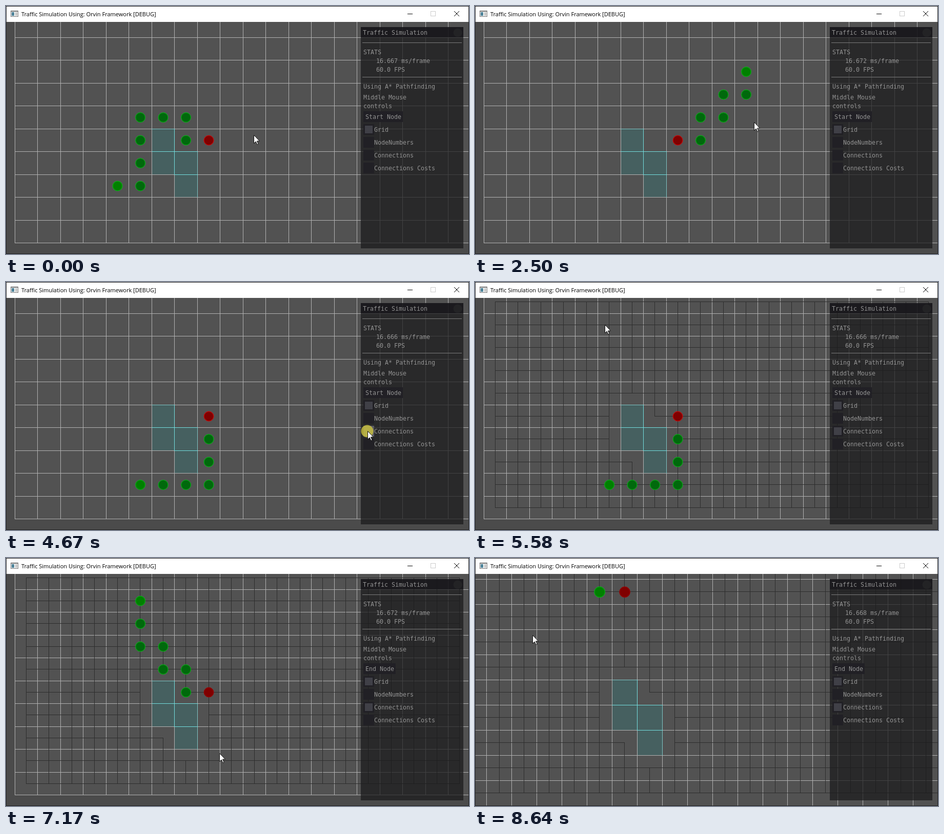
Write an HTML page with a canvas that moves like this. It is 903 px wide and 483 px high and loops after 8.71 s.

```html
<!DOCTYPE html>
<html lang="en">
<head>
<meta charset="utf-8">
<title>Traffic Simulation</title>
<style>
html, body { margin: 0; width: 100%; height: 100%; overflow: hidden; background: #4b4b4b; }
canvas { display: block; }
</style>
</head>
<body>
<canvas id="stage" width="903" height="483"></canvas>
<script>
const ctx = document.getElementById("stage").getContext("2d");
const LOOP = 8710, REST = 100, PRESS = 70;
const COLS = 20, ROWS = 10, PITCH = 44.5, LEFT = 17, TOP = 16.5;
const CONNECT_AT = 4740, MODE_AT = 6770, ZOOM_AT = 8420;
const MONO = '11.63px "DejaVu Sans Mono", monospace';
const isWall = (i, j) => i === 6 && (j === 5 || j === 6) || i === 7 && (j === 6 || j === 7);

// Cells visited from a start, one letter per step
function trace(i, j, path) {
  const cells = [[i, j]];
  for (const step of path) {
    i += (step === "R") - (step === "L");
    j += (step === "D") - (step === "U");
    cells.push([i, j]);
  }
  return cells;
}

// Stops of the cursor: plain points, pressed buttons and picked nodes
const point = (at, x, y) => ({ at, x, y });
const press = (at, x, y) => ({ at, x, y, press: true });
const pick = (at, [i, j], route) =>
  ({ at, x: LEFT + (i + .5) * PITCH - 9, y: TOP + (j + .5) * PITCH, route });
const pickStart = (at, i, j, path) => pick(at, [i, j], trace(i, j, path));
const pickEnd = (at, path) => {
  const route = trace(5, 1, path);
  return pick(at, route.at(-1), route);
};
const stops = [
  { ...point(0, 483, 251), route: trace(4, 7, "RUUURRDR") },
  pickStart(1500, 11, 2, "DLDLDL"),
  pickStart(3390, 12, 6, "LLLLU"),
  pickStart(3935, 5, 8, "RRRUUU"),
  press(4670, 705, 290),
  pickStart(5650, 5, 1, "DDRDRDR"),
  press(6700, 752, 220),
  pickEnd(7350, "DDDDDDRDRR"),
  point(7815, 540, 224),
  pickEnd(8210, "R"),
  point(8655, 112, 150)
];

function cursorAt(t) {
  const n = stops.findLastIndex(s => s.at <= t);
  const a = stops[n], b = stops[n + 1] || a;
  const span = b.at - a.at - 2 * REST;
  const u = span > 0 ? Math.min(1, Math.max(0, (t - a.at - REST) / span)) : 0;
  const eased = u * u * (3 - 2 * u);
  return {
    x: Math.round(a.x + (b.x - a.x) * eased),
    y: Math.round(a.y + (b.y - a.y) * eased),
    pressed: stops.some(s => s.press && Math.abs(t - s.at) <= PRESS)
  };
}

// Milliseconds per frame: a slow swell and one late spike
function frameTime(t) {
  const bump = (height, center, width) => height * Math.exp(-(((t - center) / width) ** 2));
  return 16.66635 + bump(.0069, 2000, 1300) + bump(.0376, 7815, 461);
}

function box(x, y, w, h, color) {
  ctx.fillStyle = color;
  ctx.fillRect(x, y, w, h);
}

function text(str, x, y, font = MONO, color = "#939393") {
  ctx.font = font;
  ctx.fillStyle = color;
  ctx.fillText(str, x, y);
}

function disc(x, y, r, fill, stroke) {
  ctx.beginPath();
  ctx.arc(x, y, r, 0, 2 * Math.PI);
  ctx.fillStyle = fill;
  ctx.fill();
  if (!stroke) return;
  ctx.strokeStyle = stroke;
  ctx.stroke();
}

function polyline(points, color, fill) {
  ctx.beginPath();
  points.forEach(([x, y]) => ctx.lineTo(x, y));
  if (fill) {
    ctx.closePath();
    ctx.fillStyle = fill;
    ctx.fill();
  }
  ctx.strokeStyle = color;
  ctx.stroke();
}

function drawWorld(t) {
  const zoom = t < ZOOM_AT ? 1 : 1.1;
  const gx = i => 451 + (LEFT - 451 + i * PITCH) * zoom;
  const gy = j => 256.5 + (TOP - 256.5 + j * PITCH) * zoom;
  const px = i => Math.floor(gx(i)), py = j => Math.floor(gy(j));
  const hLine = (i1, i2, j, color) => box(px(i1), py(j), px(i2) - px(i1) + 1, 1, color);
  const vLine = (i, j1, j2, color) => box(px(i), py(j1), 1, py(j2) - py(j1) + 1, color);
  const eachCell = visit => {
    for (let i = 0; i < COLS; i++) for (let j = 0; j < ROWS; j++) visit(i, j);
  };

  box(0, 0, 903, 483, "#4b4b4b");
  box(px(0), py(0), px(COLS) - px(0), py(ROWS) - py(0), "#525252");
  for (let i = 0; i <= COLS; i++) vLine(i, 0, ROWS, "#b2b2b2");
  for (let j = 0; j <= ROWS; j++) hLine(0, COLS, j, "#b2b2b2");

  eachCell((i, j) => {
    if (!isWall(i, j)) return;
    box(px(i) + 1, py(j) + 1, px(i + 1) - px(i) - 1, py(j + 1) - py(j) - 1, "#466060");
    hLine(i, i + 1, j, "#80c4c4");
    vLine(i + 1, j, j + 1, "#80c4c4");
  });
  vLine(7, 5, 7, "#74dede");
  hLine(6, 8, 6, "#74dede");
  hLine(7, 8, 7, "#74dede");

  if (t >= CONNECT_AT) {
    const free = (i, j) => i < COLS && j < ROWS && !isWall(i, j);
    eachCell((i, j) => {
      if (!free(i, j)) return;
      if (free(i + 1, j)) hLine(i + .5, i + 1.5, j + .5, "#2d2d2d");
      if (free(i, j + 1)) vLine(i + .5, j + .5, j + 1.5, "#2d2d2d");
    });
  }

  const { route } = stops.findLast(s => s.route && s.at <= t);
  route.forEach(([i, j], n) => {
    const isEnd = n === route.length - 1;
    const fill = isEnd ? "#800000" : n ? "#00690c" : "#008000";
    const stroke = !isEnd ? "#00c414" : t < MODE_AT ? "#e60000" : "#a00000";
    disc(gx(i + .5) + .3, gy(j + .5) + .3, 9.4 * zoom, fill, stroke);
  });
}

function drawPanel(t, cursor) {
  const control = (x, y, w, h) => {
    const hover = cursor.x >= x && cursor.x <= x + w && cursor.y >= y && cursor.y <= y + h;
    box(x, y, w, h, !hover ? "#212025" : cursor.pressed ? "#5a5a62" : "#302f37");
  };
  box(692, 41, 200, 431, "rgba(27,27,28,.735)");
  box(692, 41, 200, 20, "rgba(20,19,24,.65)");
  disc(881, 52, 8.5, "#232325");
  text("Traffic Simulation", 696, 56);
  box(695, 71, 194, 1, "#7c7c7c");
  box(695, 138, 194, 1, "#7c7c7c");

  const ms = frameTime(t);
  text("STATS", 697, 94);
  text(ms.toFixed(3) + " ms/frame", 722, 111);
  text((1000 / ms).toFixed(1) + " FPS", 722, 128);
  text("Using A* Pathfinding", 697, 161);
  text("Middle Mouse", 697, 182);
  text("controls", 697, 199);

  const mode = t < MODE_AT ? "Start Node" : "End Node";
  control(697, 205, mode.length * 7 + 7, 21);
  text(mode, 701, 220);

  ["Grid", "NodeNumbers", "Connections", "Connections Costs"].forEach((label, n) => {
    const y = 230 + n * 25;
    control(697, y, 21, 21);
    if (n === 0 || n === 2 && t >= CONNECT_AT) box(700, y + 3, 15, 15, "#404047");
    text(label, 718, y + 15);
  });
}

function drawWindow() {
  box(0, 0, 903, 31, "#fff");
  ctx.strokeStyle = "#202020";
  ctx.strokeRect(.5, .5, 902, 482);
  box(9, 9, 15, 12, "#777");
  box(10, 11, 13, 9, "#f4f4f4");
  box(11, 12, 5, 7, "#4d8399");
  box(18, 12, 4, 7, "#c8c8c8");
  text("Traffic Simulation Using: Orvin Framework [DEBUG]", 30, 20,
    '11px "Open Sans", sans-serif', "#000");
  box(783, 15, 10, 1, "#000");
  ctx.strokeStyle = "#ccc";
  ctx.strokeRect(828.5, 10.5, 9, 9);
  polyline([[874, 10], [884, 20]], "#000");
  polyline([[884, 10], [874, 20]], "#000");
}

function drawCursor({ x, y, pressed }) {
  if (pressed) disc(x - .5, y + .5, 12, "rgba(214,204,62,.75)");
  ctx.save();
  ctx.translate(x + .5, y + .5);
  polyline([[0, 0], [0, 16], [3.7, 12.5], [6.5, 18.5], [8.7, 17.5], [6, 11.5], [11, 11.5]],
    "#111", "#fff");
  ctx.restore();
}

function draw() {
  const t = performance.now() % LOOP;
  const cursor = cursorAt(t);
  drawWorld(t);
  drawPanel(t, cursor);
  drawWindow();
  drawCursor(cursor);
  requestAnimationFrame(draw);
}
draw();
</script>
</body>
</html>
```
